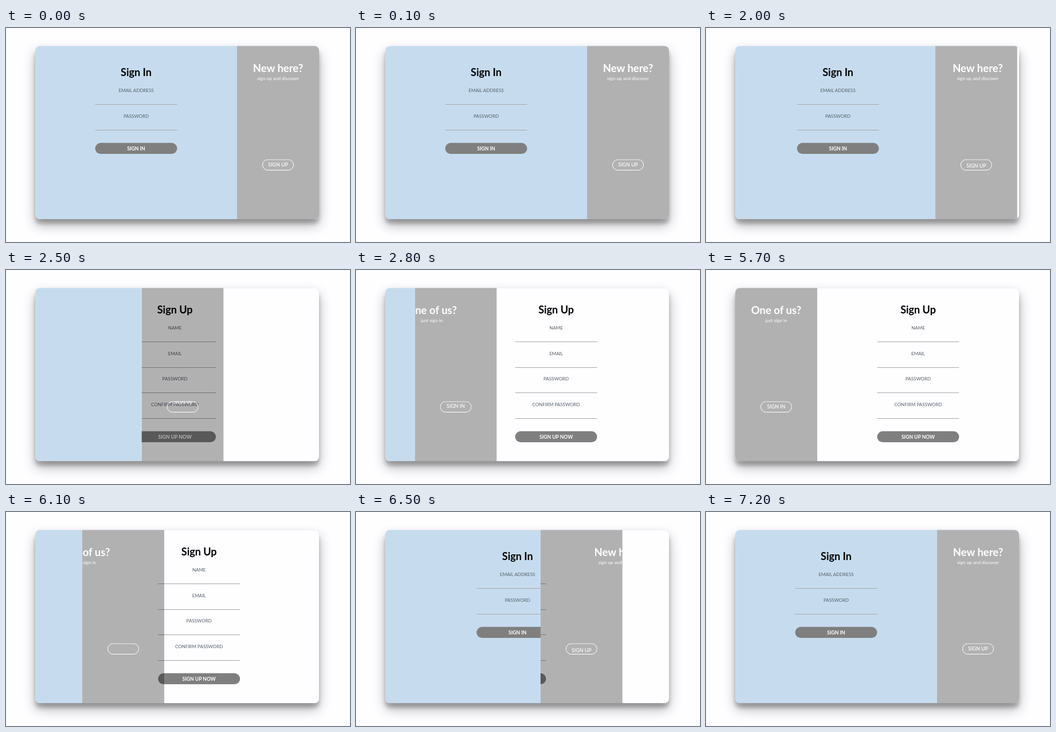
An HTML page for the animation above (7300 ms loop, 600x374 px).

```html
<!DOCTYPE html>
<html lang="en">
<head>
<meta charset="utf-8">
<title>Sliding sign-in card</title>
<style>
  html, body { margin: 0; width: 100%; height: 100%; overflow: hidden; background: #fefdff; }
  #shadow {
    position: absolute; left: 51px; top: 32px; width: 495px; height: 302px; border-radius: 8px;
    box-shadow: 0 10.5px 21px rgba(0,0,0,.3), 0 8px 6.6px rgba(0,0,0,.22);
  }
  #card {
    position: absolute; left: 0; top: 0; width: 600px; height: 374px;
    clip-path: inset(31.5px 54px 40px 51px round 8px);
    background: #c6dcee;
  }
  #card svg { overflow: hidden; }
  text { font-family: Lato, "Open Sans", sans-serif; text-anchor: middle; fill: #fff; }
  .title { font-size: 18px; font-weight: 700; fill: #000; }
  .label { font-size: 8px; fill: #55606a; }
  .action { font-size: 8.6px; font-weight: 700; }
  .head { font-size: 18.5px; font-weight: 700; }
  .sub { font-size: 8.2px; }
  .switch { font-size: 8.8px; font-weight: 500; }
</style>
</head>
<body>
<div id="shadow"></div>
<svg id="card" viewBox="0 0 600 374">
  <g id="signIn"></g>
  <svg id="slider" y="0" width="495" height="374">
    <rect width="495" height="374" fill="#fefdff"/>
    <g id="signUp"></g>
    <svg width="143" height="374">
      <rect width="143" height="374" fill="#000" fill-opacity=".3"/>
      <g id="textUp">
        <text class="head" x="71.5" y="77">New here?</text>
        <text class="sub" x="71.5" y="91">sign up and discover</text>
      </g>
      <g id="textIn">
        <text class="head" x="71.5" y="77">One of us?</text>
        <text class="sub" x="71.5" y="91">just sign in</text>
      </g>
      <svg x="44" y="229.5" width="55" height="19.5">
        <text id="switchUp" class="switch" x="27.5" y="12.8">SIGN UP</text>
        <text id="switchIn" class="switch" x="27.5" y="12.8">SIGN IN</text>
        <rect x=".5" y=".5" width="54" height="18.5" rx="9.25" fill="none" stroke="#fff"/>
      </svg>
    </svg>
  </svg>
</svg>
<script>
const LOOP = 7300, DURATION = 1200, OPEN_AT = 1920, CLOSE_AT = 5700;
const $ = id => document.getElementById(id);

// Builds a form centred on x = 0.
function buildForm(id, title, titleY, fields, firstLine, action, actionY) {
  let html = `<text class="title" y="${titleY}">${title}</text>`;
  fields.forEach((name, i) => {
    const y = Math.floor(firstLine + i * 44.7);
    html += `<text class="label" y="${y - 21}">${name}</text>
      <rect x="-71.5" y="${y}" width="143" height="1" fill="#a8a8a8"/>`;
  });
  html += `<rect x="-71.5" y="${actionY}" width="143" height="19.3" rx="9.65" fill="#7f7f7f"/>
    <text class="action" y="${actionY + 12.7}">${action}</text>`;
  $(id).innerHTML = html;
}
buildForm('signIn', 'Sign In', 84, ['EMAIL ADDRESS', 'PASSWORD'], 133.4, 'SIGN IN', 200.8);
buildForm('signUp', 'Sign Up', 76, ['NAME', 'EMAIL', 'PASSWORD', 'CONFIRM PASSWORD'], 125.4, 'SIGN UP NOW', 281.8);

function bezier(x1, y1, x2, y2) {
  const at = (a, b, u) => 3 * a * u * (1 - u) ** 2 + 3 * b * u * u * (1 - u) + u ** 3;
  return x => {
    if (x <= 0 || x >= 1) return x <= 0 ? 0 : 1;
    let lo = 0, hi = 1;
    for (let i = 0; i < 30; i++) {
      const mid = (lo + hi) / 2;
      if (at(x1, x2, mid) < x) lo = mid; else hi = mid;
    }
    return at(y1, y2, lo);
  };
}
const ease = bezier(.25, .1, .25, 1);
const easeOut = bezier(0, 0, .58, 1);
const easeInOut = bezier(.42, 0, .58, 1);

const move = (id, x, y = 0) => $(id).setAttribute('transform', `translate(${x} ${y})`);

function draw(now) {
  const t = now % LOOP;
  const closing = t >= CLOSE_AT;
  const x = (t - (closing ? CLOSE_AT : OPEN_AT)) / DURATION;
  const progress = curve => closing ? 1 - curve(x) : curve(x);
  const slide = progress(easeInOut);
  const form = progress(closing ? easeOut : easeInOut);
  const flip = progress(ease);

  $('slider').setAttribute('x', 403 - 352 * slide);
  move('signIn', 227 + 352 * form);
  move('signUp', 319 - 495 * (1 - slide));
  move('textUp', 286 * slide);
  move('textIn', -286 * (1 - slide));
  move('switchUp', 0, 39.6 * flip);
  move('switchIn', 0, -39.6 * (1 - flip));
}

const start = performance.now();
function tick() {
  draw(performance.now() - start);
  requestAnimationFrame(tick);
}
tick();
</script>
</body>
</html>
```
